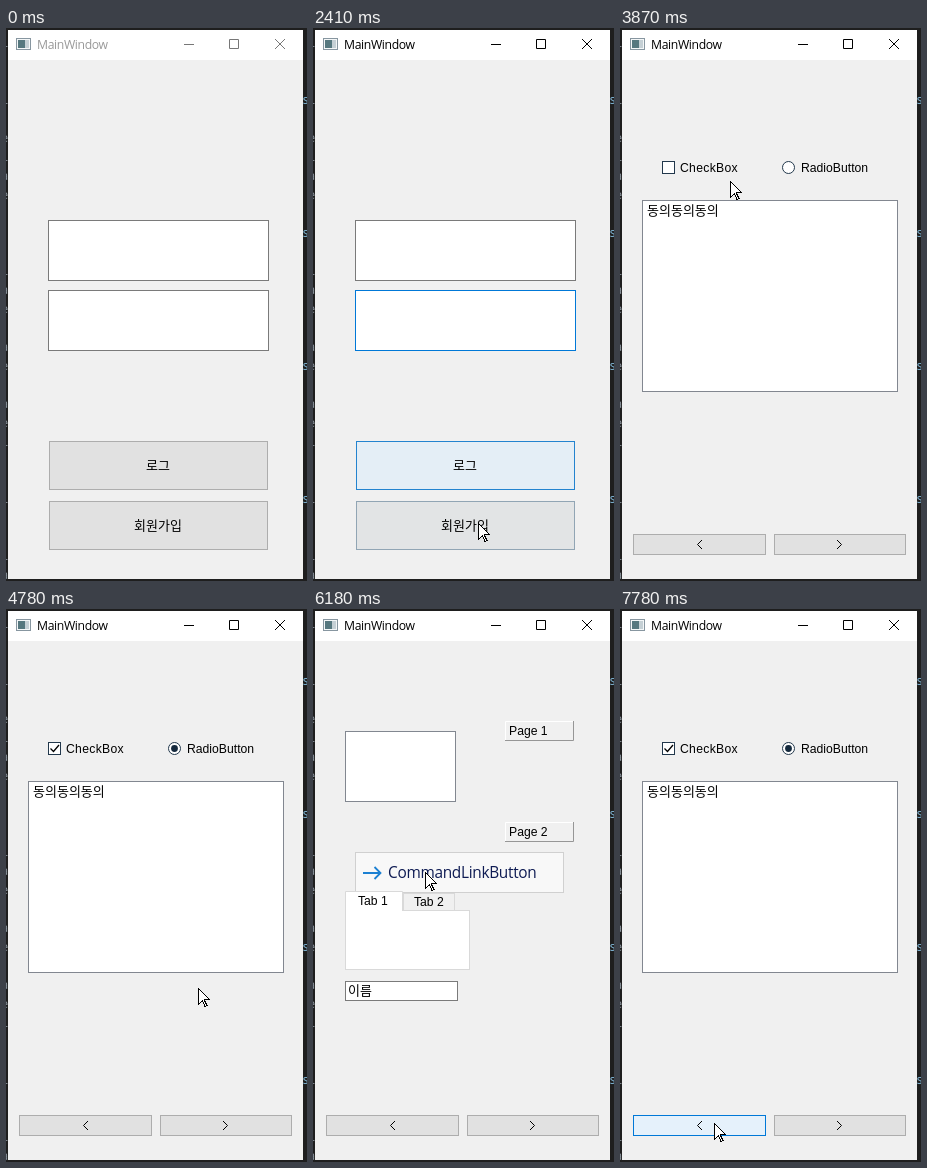
These frames come from a looping animation (301x553 px, 8 s). An HTML page:

```html
<!DOCTYPE html>
<html lang="ko">
<head>
<meta charset="utf-8">
<style>
html, body { margin: 0; width: 100%; height: 100%; overflow: hidden; background: #1e1e1e; }
svg { display: block; width: 301px; height: 553px; }
text { font: 12.2px "Liberation Sans", Arial, sans-serif; fill: #000; white-space: pre; }
.ko { font: 13px "Noto Sans CJK KR", "Noto Sans CJK", sans-serif; }
.ui { font: 12.2px "Open Sans", "Noto Sans", sans-serif; letter-spacing: -.36px; }
.link { font: 15.4px "Open Sans", "Noto Sans", sans-serif; letter-spacing: -.3px; }
.code { font: 12px "Noto Sans Mono", monospace; fill: #8b949c; }
.line { fill: none; stroke: #000; }
</style>
</head>
<body>
<svg id="stage" viewBox="0 0 301 553"></svg>
<script>
const LOOP = 8000, STEP = 70, PHASE = 20, FADE = 500, SAMPLES = 25, PRESS = 80;
const clicks = { focus: 810, join: 2620, check: 4150, radio: 4430, next: 5270, prev: 7500 };
const stage = document.getElementById('stage');

function add(parent, tag, attrs, text) {
  const node = document.createElementNS('http://www.w3.org/2000/svg', tag);
  for (const key in attrs) node.setAttribute(key, attrs[key]);
  if (text) node.textContent = text;
  return parent.appendChild(node);
}
const group = attrs => add(stage, 'g', attrs);
const label = (p, x, y, text, cls = '') => add(p, 'text', { x, y, class: cls }, text);
const path = (p, d, more) => add(p, 'path', { d, class: 'line', ...more });
const fillRect = (p, x, y, width, height, fill) => add(p, 'rect', { x, y, width, height, fill });
// A box with a crisp one-pixel outline; size includes the outline.
const box = (p, x, y, w, h, fill = '#fff', stroke = '#7a7a7a') =>
  add(p, 'rect', { x: x + .5, y: y + .5, width: w - 1, height: h - 1, fill, stroke });
const show = (node, on) => node.setAttribute('visibility', on ? 'inherit' : 'hidden');

// A control that reacts to the pointer while its page is shown.
function control(p, x, y, w, h, click, usable) {
  const isOver = t => {
    const [px, py] = pointerAt(t);
    return usable(t) && px >= x && px < x + w && py >= y && py < y + h;
  };
  return { node: box(p, x, y, w, h), click, isOver };
}
const onLogin = t => t < clicks.join;
const onWidgets = t => t >= clicks.next && t < clicks.prev;
const hasNav = t => !onLogin(t);

// Editor behind the window
fillRect(stage, 0, 0, 301, 553, '#1e1e1e');
let seed = 5;
const random = () => (seed = seed * 16807 % 2147483647) / 2147483647;
for (let row = 0; row < 29; row++) {
  const y = 19 * (row + 1);
  if (random() < .45) label(stage, -5, y, 'lae'[row % 3], 'code');
  if (row % 7 === 3) label(stage, 296, y, 's', 'code').style.fill = '#7fb4d4';
}

// Window
fillRect(stage, 2, 2, 295, 549, '#f0f0f0');
fillRect(stage, 2, 2, 295, 30, '#fff');
box(stage, 10, 10, 15, 12, '#f4f7f8', '#8796a0');
fillRect(stage, 12, 12, 7, 8, '#56787f');
fillRect(stage, 19, 12, 4, 8, '#c5d0d5');
const title = label(stage, 31, 21, 'MainWindow', 'ui');
const controls = path(stage, 'M178 16.5H188M223.5 11.5H232.5V20.5H223.5ZM269 11L279 21M279 11L269 21');

// Login page
const login = group();
box(login, 42, 192, 221, 61);
const field = box(login, 42, 262, 221, 61);
const caret = path(login, 'M45.5 287V299');
const loginBtn = control(login, 43, 413, 219, 49, null, onLogin);
const joinBtn = control(login, 43, 473, 219, 49, clicks.join, onLogin);
label(login, 140, 442, '로그', 'ko');
label(login, 128, 502, '회원가입', 'ko');

// Agreement page
const agree = group();
box(agree, 42, 133, 13, 13, '#fff', '#22384c');
const tick = path(agree, 'M44.5 139.5L47.5 142.5L53 136', { 'stroke-width': 1.3 });
add(agree, 'circle', { cx: 168.5, cy: 139.5, r: 6, fill: '#fff', stroke: '#22384c' });
const dot = add(agree, 'circle', { cx: 168.5, cy: 139.5, r: 3.4, fill: '#14293d' });
label(agree, 60, 144, 'CheckBox').setAttribute('letter-spacing', .3);
label(agree, 181, 144, 'RadioButton');
box(agree, 22, 172, 256, 192, '#fff', '#828790');
label(agree, 27, 187, '동의동의동의', 'ko');

// Widgets page
const widgets = group();
box(widgets, 32, 122, 111, 71, '#fff', '#828790');
[112, 213].forEach((y, i) => {
  path(widgets, `M192.5 ${y + 19}V${y + .5}H260`, { style: 'stroke:#fff' });
  path(widgets, `M192 ${y + 19.5}H260.5V${y}`, { style: 'stroke:#969696' });
  label(widgets, 196, y + 14, `Page ${i + 1}`);
});
const linkBtn = control(widgets, 42, 243, 209, 41, null, onWidgets);
paint(linkBtn.node, '#f8f8f8', '#d0d0d0');
path(widgets, 'M50 264H67.5M61.5 258L67.5 264L61.5 270', { style: 'stroke:#1c80d2', 'stroke-width': 1.8 });
const linkText = label(widgets, 75, 269, 'CommandLinkButton', 'link');
box(widgets, 32, 301, 125, 60, '#fff', '#d9d9d9');
box(widgets, 90, 284, 52, 18, '#f0f0f0', '#d9d9d9');
path(widgets, 'M32.5 302V282.5H89.5V302', { style: 'fill:#fff;stroke:#d9d9d9' });
label(widgets, 45, 296, 'Tab 1');
label(widgets, 101, 297, 'Tab 2');
box(widgets, 32, 372, 113, 20);
label(widgets, 35, 386, '이름', 'ko');

// Page navigation
const nav = group();
const prevBtn = control(nav, 13, 506, 133, 21, clicks.prev, hasNav);
const nextBtn = control(nav, 154, 506, 132, 21, clicks.next, hasNav);
path(nav, 'M82 512L77.5 516.5L82 521M217 512L221.5 516.5L217 521');

// Mouse pointer
const pointer = group({ 'shape-rendering': 'crispEdges' });
const arrow = path(pointer, 'M.5 .5V16.5L4.5 12.5L7 18.5L9 17.5L6.5 12.5V11.5H11.5Z', { style: 'fill:#fff' });
const beam = path(pointer, 'M-3 -7.5H3M.5 -7.5V7.5M-3 7.5H3');

// Where the pointer arrives, when, and how long it rests there.
const stops = [
  { at: 0, x: 306, y: 440, rest: 130 },
  { at: 720, x: 178, y: 312, rest: 140 },
  { at: 1000, x: 158, y: 363, rest: 450 },
  { at: 2070, x: 160, y: 446, rest: 200 },
  { at: 2400, x: 165, y: 495, rest: 280 },
  { at: 2820, x: 185, y: 508, rest: 200 },
  { at: 3240, x: 231, y: 355 },
  { at: 3660, x: 93, y: 190 },
  { at: 3870, x: 110, y: 153 },
  { at: 4080, x: 48, y: 139, rest: 110 },
  { at: 4370, x: 167, y: 138, rest: 100 },
  { at: 4710, x: 183, y: 347 },
  { at: 5060, x: 226, y: 507, rest: 260 },
  { at: 5620, x: 230, y: 285 },
  { at: 5900, x: 112, y: 122 },
  { at: 6110, x: 112, y: 263, rest: 150 },
  { at: 6670, x: 96, y: 490 },
  { at: 6810, x: 94, y: 514 }
];

const clamp = k => Math.min(1, Math.max(0, k));
const lerp = (a, b, k) => a + (b - a) * k;
const rgb = hex => [1, 3, 5].map(i => parseInt(hex.slice(i, i + 2), 16));
function blend(a, b, k) {
  const to = rgb(b);
  return `rgb(${rgb(a).map((v, i) => Math.round(lerp(v, to[i], k)))})`;
}
function paint(node, fill, stroke) {
  node.setAttribute('fill', fill);
  node.setAttribute('stroke', stroke);
}

function pointerAt(t) {
  const i = Math.max(0, stops.findLastIndex(stop => stop.at <= t));
  const a = stops[i], b = stops[i + 1] || a;
  const leave = a.at + (a.rest || 0);
  const k = b === a ? 0 : clamp((t - leave) / (b.at - leave));
  return [lerp(a.x, b.x, k), lerp(a.y, b.y, k)];
}

// The share of the last FADE ms spent over a control gives a linear fade in and out.
function hoverLevel(item, t) {
  let hits = 0;
  for (let i = 0; i < SAMPLES; i++) hits += item.isOver(t - FADE * i / SAMPLES);
  return hits / SAMPLES;
}
function paintButton(button, t) {
  const pressed = t < button.click && t > button.click - PRESS;
  const level = hoverLevel(button, t);
  if (pressed) paint(button.node, '#cce4f7', '#005499');
  else paint(button.node, blend('#e1e1e1', '#e5f1fb', level), blend('#adadad', '#0078d7', level));
}

function movePointer(t) {
  const stepped = Math.floor((t - PHASE + .01) / STEP) * STEP + PHASE;
  const [x, y] = pointerAt(stepped).map(Math.round);
  const typing = onLogin(t) && x > 42 && x < 263 && y > 262 && y < 323;
  pointer.setAttribute('transform', `translate(${x} ${y})`);
  show(pointer, t >= stops[0].rest);
  show(arrow, !typing);
  show(beam, typing);
}

function render(t) {
  const active = t >= clicks.focus;
  title.style.fill = active ? '#000' : '#999';
  controls.style.stroke = active ? '#000' : '#777';
  show(login, onLogin(t));
  show(agree, hasNav(t) && !onWidgets(t));
  show(widgets, onWidgets(t));
  show(nav, hasNav(t));
  const sinceFocus = t - clicks.focus;
  field.setAttribute('stroke', active ? blend('#171717', '#0078d7', clamp(sinceFocus / 420)) : '#7a7a7a');
  show(caret, active && t < 2400 && Math.floor((sinceFocus - 70) / 535) % 2 === 0);
  show(tick, t >= clicks.check);
  show(dot, t >= clicks.radio);
  [loginBtn, joinBtn, prevBtn, nextBtn].forEach(button => paintButton(button, t));
  show(linkBtn.node, linkBtn.isOver(t));
  linkText.style.fill = blend('#0c1430', '#1433c0', hoverLevel(linkBtn, t));
  movePointer(t);
}

const start = performance.now();
function frame() {
  render((performance.now() - start) % LOOP);
  requestAnimationFrame(frame);
}
frame();
</script>
</body>
</html>
```
